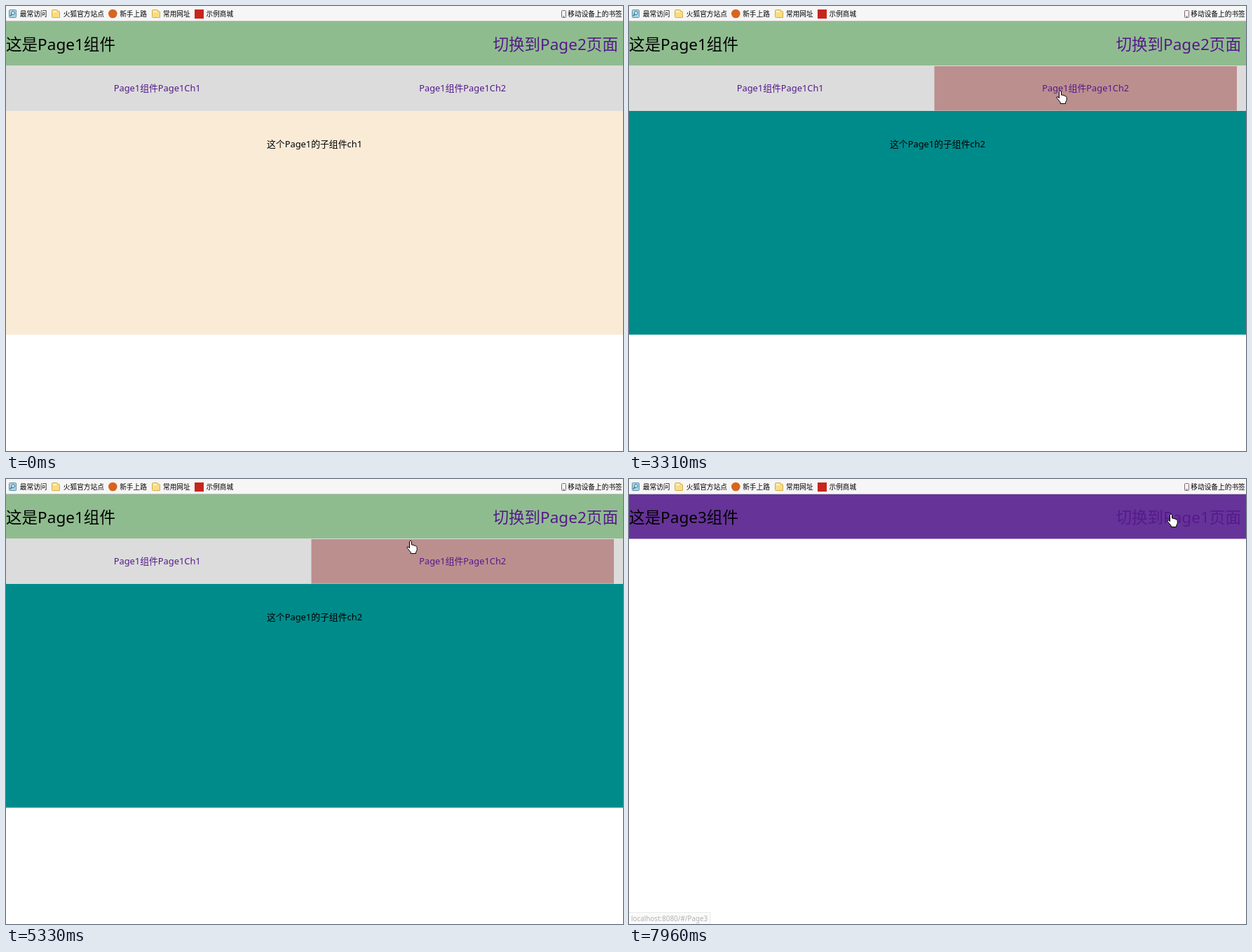
These frames come from a looping animation (880x636 px, 8 s). An HTML page:

```html
<!DOCTYPE html>
<html lang="zh-CN">
<head>
<meta charset="utf-8">
<title>Page router demo</title>
<style>
html, body { margin: 0; width: 100%; height: 100%; overflow: hidden; background: #fff; }
svg { display: block; width: 880px; height: 636px; }
text { font: 12.85px "Noto Sans", "Noto Sans CJK SC", "Noto Sans CJK", sans-serif; white-space: pre; }
.mid { text-anchor: middle; }
.big { font-size: 22.55px; }
.bar text { font-size: 9.7px; }
.link { fill: #551a8b; }
.link.pressed { fill: #f00; }
.tab { fill: #bc8f8f; }
#status text { font-size: 9.85px; fill: #333; }
.pointer { fill: #fff; stroke: #000; stroke-linejoin: round; }
</style>
</head>
<body>
<svg viewBox="0 0 880 636">
  <defs>
    <g id="folder">
      <path d="M.5 1.5q0-1 1-1h6q1 0 1 1v1h2q1 0 1 1v8h-10q-1 0-1-1z" fill="#f7dd83" stroke="#d3ae4c"/>
      <path d="M2 2h5v2H2z" fill="#fff3c4"/>
    </g>
  </defs>

  <g class="bar">
    <rect width="880" height="21" fill="#f6f6f6"/>
    <rect y="21" width="880" height="1" fill="#c2c2c2"/>
    <rect x="4.5" y="5.5" width="10" height="11" rx="1" fill="#a9d3e6" stroke="#5b93ad"/>
    <circle cx="10" cy="10" r="2.3" fill="#e6f5fc" stroke="#34687f"/>
    <path d="M8.3 11.8l-2.3 2.4" stroke="#34687f" stroke-width="1.4"/>
    <use href="#folder" x="65" y="5"/>
    <circle cx="152.3" cy="11" r="6.3" fill="#d8641f"/>
    <use href="#folder" x="208" y="5"/>
    <rect x="269" y="5" width="13" height="13" fill="#c7261c"/>
    <rect x="792.5" y="6.5" width="6" height="10" rx="1" fill="#f8f4f6" stroke="#77696f"/>
    <path d="M794 15h3" stroke="#77696f"/>
    <text x="19.8" y="15">最常访问</text>
    <text x="81.8" y="15">火狐官方站点</text>
    <text x="162.2" y="15">新手上路</text>
    <text x="224" y="15">常用网址</text>
    <text x="285.5" y="15">示例商城</text>
    <text x="801.3" y="15">移动设备上的书签</text>
  </g>

  <rect id="header" y="22" width="880" height="63.5"/>
  <text id="title" class="big" x="0" y="63"></text>
  <text id="switch" class="big mid link" x="783.7" y="63"></text>

  <g id="children">
    <rect y="85" width="880" height="65" fill="#dcdcdc"/>
    <rect id="tab1" class="tab" y="86" width="432" height="63.6"/>
    <rect id="tab2" class="tab" x="435.5" y="86" width="431.5" height="63.6"/>
    <text id="link1" class="mid link" x="215.7" y="122.3">Page1组件Page1Ch1</text>
    <text id="link2" class="mid link" x="651.2" y="122.3">Page1组件Page1Ch2</text>
    <rect id="panel" y="150" width="880" height="319.7"/>
    <text id="body" class="mid" x="440" y="202.3"></text>
  </g>

  <g id="status">
    <rect id="statusBox" x="-.5" y="619.5" height="18" fill="#f2f2f2" stroke="#c8c8c8"/>
    <text id="url" x="3" y="632"></text>
  </g>

  <g id="cursor" class="pointer">
    <path id="arrow" d="M0 0V13.5l3-2.8 2 4.6 2.1-.9-2-4.4h4.2z"/>
    <path id="hand" d="M-1.5 1.2q1.5-2.4 3 0V6l2.3.4 2.4.8 2 .9 1 1.4v4l-1.6 3.2v1.8H.2v-1.8L-5 10.3q-.2-2.2 2-1.3l1.5 1.8z"/>
  </g>
</svg>

<script>
const LOOP = 8000, START = 430, TICK = 77.6;
const HOLD = 150, HINT_DELAY = 70;            // mouse button held, link address delayed
const $ = id => document.getElementById(id);

// Each visit moves the pointer to a link and clicks it.
const visits = [
  { leave: START, arrive: 1060, press: 1360, x: 222, y: 122, route: 'Page1/Page1Ch1' },
  { leave: 1690, arrive: 2300, press: 2360, x: 630, y: 121, route: 'Page1/Page1Ch2' },
  { leave: 3230, arrive: 3780, press: 3770, x: 312, y: 119, route: 'Page1/Page1Ch1' },
  { leave: 4110, arrive: 4410, press: 4480, x: 472, y: 109, route: 'Page1/Page1Ch2' },
  { leave: 5000, arrive: 5800, press: 5940, x: 773, y: 50, route: 'Page2' },
  { leave: 6000, arrive: 6090, press: 7728, x: 773, y: 50, route: 'Page3' }
];
const entry = { x: 652, y: 489, route: 'Page1/Page1Ch1' };

const headerColors = ['#8fbc8f', '#bdb76b', '#639'];
const panelColors = ['#faebd7', '#008b8b'];

const clamp = u => Math.max(0, Math.min(1, u));
const ease = u => u * u * (3 - 2 * u);
const show = (id, on) => $(id).style.display = on ? '' : 'none';

// Replays the visits up to t; the address stays up until a click changes the route.
function stateAt(t) {
  let { x, y, route } = entry, pressed = false, opacity = 0;
  for (const v of visits) {
    if (t < v.leave) break;
    const release = v.press + HOLD;
    const u = ease(clamp((t - v.leave) / (v.arrive - v.leave)));
    x += (v.x - x) * u;
    y += (v.y - y) * u;
    pressed = t >= v.press && t < release;
    if (t >= v.arrive + HINT_DELAY) opacity = 1;
    if (t >= release && v.route !== route) {
      opacity = clamp(1 - (t - release + TICK) / 250);
      route = v.route;
    }
  }
  return { x, y, route, pressed, opacity };
}

function linkUnder(x, y, page) {
  if (y < 86) return x >= 694 && x < 873 && y > 38 && y < 70 ? 'switch' : '';
  if (page !== 1 || y >= 150) return '';
  return x < 432 ? 'link1' : x >= 435.5 && x < 867 ? 'link2' : '';
}

function draw(time) {
  const t = START + Math.floor((time - START) / TICK) * TICK;
  const { x, y, route, pressed, opacity } = stateAt(t);
  const page = +route[4], child = +route.slice(-1), nextPage = page % 3 + 1;
  const hovered = t >= START ? linkUnder(x, y, page) : '';

  $('header').setAttribute('fill', headerColors[page - 1]);
  $('title').textContent = `这是Page${page}组件`;
  $('switch').textContent = `切换到Page${nextPage}页面`;

  show('children', page === 1);
  if (page === 1) {
    $('panel').setAttribute('fill', panelColors[child - 1]);
    $('body').textContent = `这个Page1的子组件ch${child}`;
  }
  show('tab1', hovered === 'link1');
  show('tab2', hovered === 'link2');
  for (const id of ['link1', 'link2', 'switch'])
    $(id).classList.toggle('pressed', pressed && hovered === id);

  // The fading address on the last page still names the route just opened.
  const address = hovered !== 'switch' ? 'Page1/Page1Ch' + hovered.slice(-1)
    : page === 3 ? route : 'Page' + nextPage;
  $('status').setAttribute('opacity', hovered ? opacity : 0);
  $('url').textContent = 'localhost:8080/#/' + address;
  $('statusBox').setAttribute('width', address.length > 5 ? 167 : 116.5);

  show('cursor', t >= START);
  $('cursor').setAttribute('transform', `translate(${Math.round(x)} ${Math.round(y)})`);
  show('hand', hovered);
  show('arrow', !hovered);
}

const began = performance.now();
function tick() {
  draw((performance.now() - began) % LOOP);
  requestAnimationFrame(tick);
}
tick();
</script>
</body>
</html>
```
